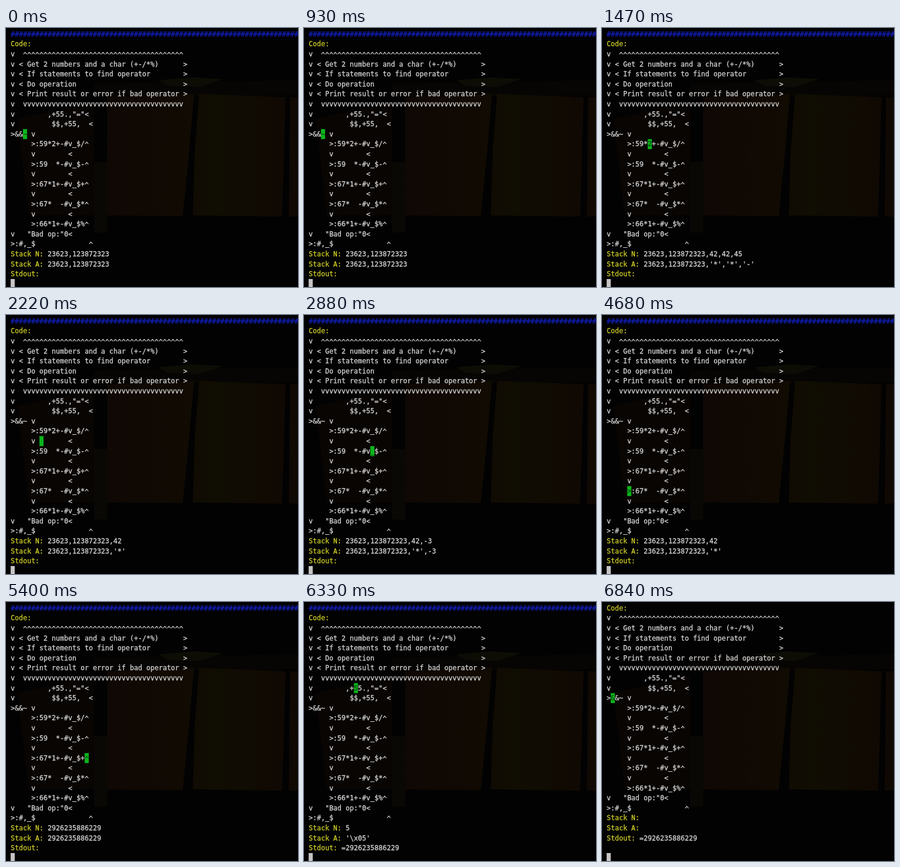
Recreate the animation shown at these times as an HTML page with a canvas. Size 514 by 456 pixels, loop 8 s.

```html
<!DOCTYPE html>
<html lang="en">
<head>
<meta charset="utf-8">
<title>Befunge debugger</title>
<style>
html, body { margin: 0; width: 100%; height: 100%; overflow: hidden; background: #040302; }
canvas { display: block; }
</style>
</head>
<body>
<canvas id="stage" width="514" height="456"></canvas>
<script>
const rows = String.raw`v  ^^^^^^^^^^^^^^^^^^^^^^^^^^^^^^^^^^^^^^^
v < Get 2 numbers and a char (+-/*%)      >
v < If statements to find operator        >
v < Do operation                          >
v < Print result or error if bad operator >
v  vvvvvvvvvvvvvvvvvvvvvvvvvvvvvvvvvvvvvvv
v        ,+55.,"="<
v         $$,+55,  <
>&&~ v
     >:59*2+-#v_$/^
     v        <
     >:59  *-#v_$-^
     v        <
     >:67*1+-#v_$+^
     v        <
     >:67*  -#v_$*^
     v        <
     >:66*1+-#v_$%^
v   "Bad op:"0<
>:#,_$             ^`.split('\n');

const LOOP = 8000, LAST = 108;
const LEFT = 8.2, TOP = 2, CELL = 7.235, LINE = 17.6, BASE = 12.8, SCREEN_LINES = 26;
const WHITE = '#d6d6d6', YELLOW = '#cccc28', BLUE = '#1220c4', GREEN = '#0cb41c';
const ctx = document.getElementById('stage').getContext('2d');

// Run the program and keep the machine state before each step.
function trace() {
  const states = [], stack = [23623, 123872323];
  const dirs = { '>': [1, 0], '<': [-1, 0], '^': [0, -1], v: [0, 1] };
  const math = { '+': (a, b) => a + b, '-': (a, b) => a - b, '*': (a, b) => a * b };
  let x = 3, y = 8, dir = dirs['>'], out = '', quoted = false;
  const move = () => { x += dir[0]; y += dir[1]; };
  for (let i = 0; i <= LAST; i++) {
    states.push({ x, y, out, stack: [...stack] });
    const op = rows[y][x] || ' ';
    if (op === '"') quoted = !quoted;
    else if (quoted) stack.push(op.charCodeAt(0));
    else if (dirs[op]) dir = dirs[op];
    else if (/\d/.test(op)) stack.push(+op);
    else if (math[op]) { const b = stack.pop(); stack.push(math[op](stack.pop(), b)); }
    else if (op === '~') stack.push('*'.charCodeAt(0));
    else if (op === ':') stack.push(stack[stack.length - 1]);
    else if (op === '$') stack.pop();
    else if (op === '_') dir = dirs[stack.pop() ? '<' : '>'];
    else if (op === '#') move();
    else if (op === '.') out += stack.pop();
    else if (op === ',') out += String.fromCharCode(stack.pop());
    move();
  }
  return states;
}
const states = trace();

// [step, start time in ms]; steps run evenly in between
const marks = [[1, 1080], [8, 1470], [33, 2880], [52, 3870], [80, 5400], [94, 6330], [LAST, 6840]];

function stepAt(t) {
  if (t < marks[0][1]) return 0;
  const next = marks.findIndex(m => t < m[1]);
  if (next < 0) return LAST;
  const [s0, t0] = marks[next - 1], [s1, t1] = marks[next];
  return Math.floor(s0 + (s1 - s0) * (t - t0) / (t1 - t0));
}

function asChar(n) {
  if (n < 0 || n > 255) return n;
  if (n === 9) return "'\\t'";
  if (n === 10) return "'\\n'";
  if (n < 32) return "'\\x" + n.toString(16).padStart(2, '0') + "'";
  return "'" + String.fromCharCode(n) + "'";
}

function shape(color, ...points) {
  ctx.fillStyle = color;
  ctx.beginPath();
  for (let i = 0; i < points.length; i += 2) ctx.lineTo(points[i], points[i + 1]);
  ctx.fill();
}

function backdrop() {
  const cloth = ctx.createLinearGradient(155, 0, 514, 0);
  cloth.addColorStop(0, '#0f0704');
  cloth.addColorStop(0.4, '#110a03');
  cloth.addColorStop(0.6, '#100d03');
  cloth.addColorStop(1, '#100803');
  shape('#030202', 0, 0, 514, 0, 514, 456, 0, 456);
  shape('#080503', 20, 160, 155, 130, 155, 330, 40, 330);
  shape('#070503', 155, 98, 514, 92, 514, 118, 155, 122);
  shape('#0d0d06', 268, 92, 330, 87, 382, 90, 340, 104, 285, 102);
  shape(cloth, 178, 122, 331, 116, 322, 220, 311, 331, 178, 330);
  shape(cloth, 340, 116, 492, 122, 486, 332, 329, 330, 332, 220);
  shape(cloth, 500, 122, 514, 122, 514, 332, 498, 332);
  shape('#0a0805', 155, 236, 178, 236, 178, 360, 155, 360);
}

// The thin outline gives the strokes their weight; carets sit low in the line.
function glyph(ch, col, line, color) {
  const x = LEFT + col * CELL, y = TOP + line * LINE + BASE + (ch === '^' ? 2 : 0);
  ctx.fillStyle = ctx.strokeStyle = color;
  ctx.fillText(ch, x, y);
  ctx.strokeText(ch, x, y);
}

function block(col, line, color) {
  ctx.fillStyle = color;
  ctx.fillRect(LEFT + col * CELL, TOP + line * LINE, CELL, LINE);
}

function draw(t) {
  const { x, y, out, stack } = states[stepAt(t)];
  const lines = ['#'.repeat(71), 'Code:', ...rows,
    'Stack N: ' + stack, 'Stack A: ' + stack.map(asChar),
    ...('Stdout: ' + out).split('\n'), ''];
  const scroll = lines.length - SCREEN_LINES;

  backdrop();
  ctx.font = '12px "DejaVu Sans Mono", monospace';
  ctx.lineWidth = 0.3;
  lines.forEach((text, i) => {
    const label = (text.match(/^(Code|Stack .|Stdout):/) || [''])[0].length;
    [...text].forEach((ch, col) => {
      if (ch !== ' ') glyph(ch, col, i - scroll, col < label ? YELLOW : i ? WHITE : BLUE);
    });
  });
  block(x, y + 2 - scroll, GREEN);
  glyph(rows[y][x] || ' ', x, y + 2 - scroll, '#04500e');
  block(0, SCREEN_LINES - 1, '#c6c4c4');
}

function frame() {
  draw(performance.now() % LOOP);
  requestAnimationFrame(frame);
}
frame();
</script>
</body>
</html>
```
